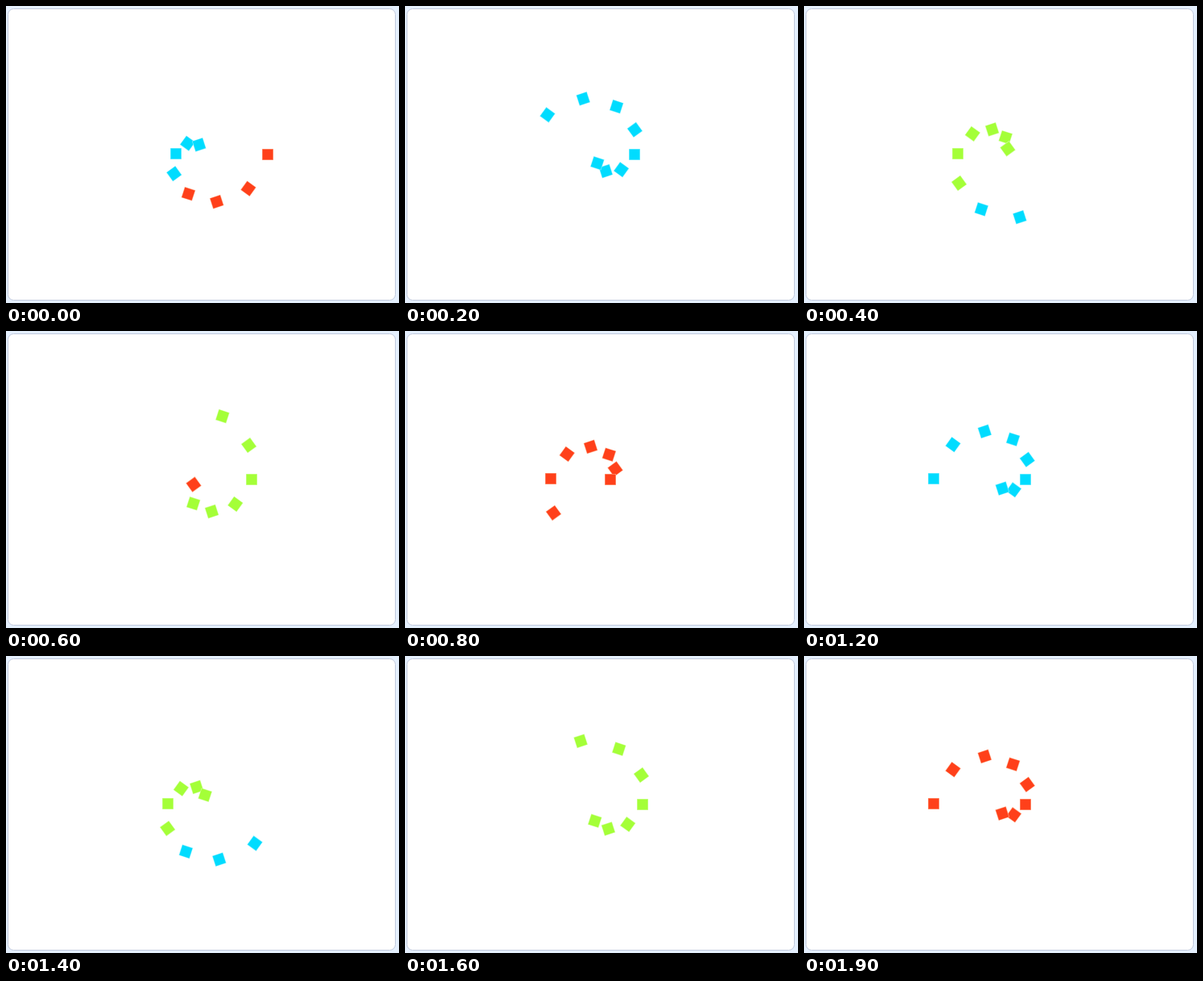
Animation of 488 by 368 pixels, one loop 2 s. Source, as an HTML page with a canvas:

```html
<!DOCTYPE html>
<html lang="en">
<head>
<meta charset="utf-8">
<title>Spiral of squares</title>
<style>
  html, body { margin: 0; width: 100%; height: 100%; overflow: hidden; background: #e5f0fe; }
  canvas { display: block; }
</style>
</head>
<body>
<canvas id="stage" width="488" height="368"></canvas>
<script>
const ctx = document.getElementById('stage').getContext('2d');

const LOOP_MS = 2000;
const STEP_MS = 100;       // the picture holds between steps
const TICKS_PER_STEP = 3;
const CYCLE = 31;          // 30 squares, then one idle tick
const CYCLE_OFFSET = 13;
const LIFETIME = 8;        // ticks a square stays visible
const CENTER = { x: 243, y: 183.5 };
const COLORS = [
  { fill: '#ff401a', edge: '#ffa585' },
  { fill: '#00dcff', edge: '#8cf0ff' },
  { fill: '#a4ff38', edge: '#d0ff9c' },
];

function drawStage() {
  ctx.fillStyle = '#e5f0fe';
  ctx.fillRect(0, 0, 488, 368);
  ctx.beginPath();
  ctx.roundRect(2.5, 3.5, 481, 361, 7);
  ctx.fillStyle = '#fff';
  ctx.fill();
  ctx.strokeStyle = '#c0c8dc';
  ctx.lineWidth = 1;
  ctx.stroke();
}

function drawSquare(radius, degrees, { fill, edge }) {
  ctx.save();
  ctx.translate(CENTER.x, CENTER.y);
  ctx.rotate(degrees * Math.PI / 180);
  ctx.translate(radius, 0.5);
  ctx.fillStyle = edge;
  ctx.fillRect(-7, -7, 14, 14);
  ctx.fillStyle = fill;
  ctx.fillRect(-6.4, -6.4, 12.8, 12.8);
  ctx.restore();
}

function draw() {
  const time = performance.now() % LOOP_MS;
  const tick = Math.floor(time / STEP_MS) * TICKS_PER_STEP;
  drawStage();
  // Oldest first, so newer squares lie on top.
  for (let age = LIFETIME - 1; age >= 0; age--) {
    const index = (tick - age + CYCLE_OFFSET + CYCLE) % CYCLE;
    if (index === CYCLE - 1) continue;
    drawSquare(12 + 10 * age, 144 + 36 * index, COLORS[Math.floor(index / 10)]);
  }
  requestAnimationFrame(draw);
}

draw();
</script>
</body>
</html>
```
